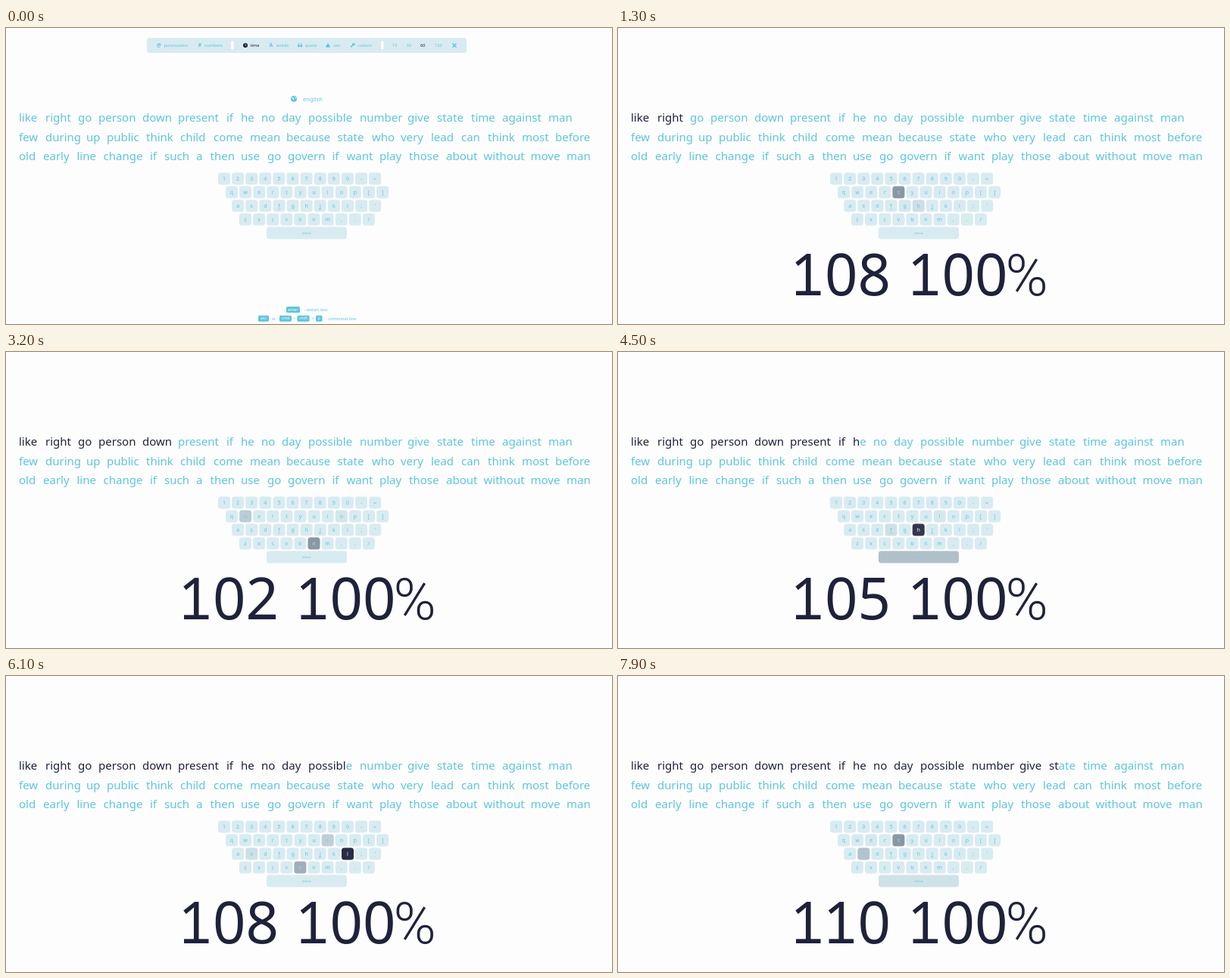
An HTML page with a canvas for the animation above (8000 ms loop, 800 px wide and 392 px high).

```html
<!DOCTYPE html>
<html lang="en">
<head>
<meta charset="utf-8">
<title>Typing test</title>
<style>
html, body { margin: 0; width: 100%; height: 100%; overflow: hidden; background: #fdfdfe; }
canvas { display: block; width: 800px; height: 392px; }
</style>
</head>
<body>
<canvas id="stage"></canvas>
<script>
const LOOP = 8000, START = 205, FADE = 125;
const BG = [253, 253, 254], SUB = [94, 197, 220], ALT = [216, 235, 241], DARK = [30, 34, 58];
const SANS = '"Noto Sans", "Open Sans", sans-serif';

const canvas = document.getElementById('stage');
const ctx = canvas.getContext('2d');
const ratio = window.devicePixelRatio || 1;
canvas.width = 800 * ratio;
canvas.height = 392 * ratio;

const lines = [
  ['like right go person down present if he no day possible number give state time against man',
    [17, 52, 95, 122, 180, 227, 291, 310, 337, 364, 399, 467, 530, 569, 614, 655, 716]],
  ['few during up public think child come mean because state who very lead can think most before',
    [17, 52, 106, 133, 185, 230, 274, 322, 370, 437.5, 483, 521, 561, 601, 636, 681, 725]],
  ['old early line change if such a then use go govern if want play those about without move man',
    [17, 49, 93.5, 128.5, 190, 209, 251, 269.5, 310, 345, 372, 430.5, 449.5, 493, 532, 581, 630.5, 692.5, 740]],
].map(([text, xs]) => ({ text, words: text.split(' ').map((word, i) => [word, xs[i]]) }));

// Typing rhythm: [characters typed, time]; steady between the points.
const rhythm = [[1, START], [9, 1100], [10, 1238], [16, 2150], [17, 2200], [18, 2297], [24, 3065], [25, 3138],
  [35, 4195], [36, 4290], [37, 4390], [38, 4493], [45, 5195], [51, 5890], [52, 5960], [53, 6015], [54, 6097],
  [55, 6190], [64, 7200], [68, 7680], [69, 7785], [70, 7838]];
const presses = [START];
for (let i = 1; i < rhythm.length; i++) {
  const [n0, t0] = rhythm[i - 1], [n1, t1] = rhythm[i];
  for (let n = n0 + 1; n <= n1; n++) presses.push(t0 + (t1 - t0) * (n - n0) / (n1 - n0));
}
const typedAt = t => presses.filter(p => p <= t).length;

const keyRows = [['1234567890-=', 288], ['qwertyuiop[]', 298], ["asdfghjkl;'", 306.2], ['zxcvbnm,./', 316]];

const rgb = c => `rgb(${c})`;
const mix = (a, b, k) => rgb(a.map((v, i) => Math.round(v + (b[i] - v) * k)));
const clamp = v => Math.max(0, Math.min(1, v));

function text(str, x, y, size, color = rgb(SUB), align = 'left', weight = 400, family = SANS) {
  ctx.font = `${weight} ${size}px ${family}`;
  ctx.textAlign = align;
  ctx.fillStyle = color;
  ctx.fillText(str, x, y);
}

function box(x, y, w, h, r, color) {
  ctx.fillStyle = color;
  ctx.beginPath();
  ctx.roundRect(x, y, w, h, r);
  ctx.fill();
}

function disc(x, y, r, color = rgb(SUB)) {
  ctx.fillStyle = color;
  ctx.beginPath();
  ctx.arc(x, y, r, 0, 7);
  ctx.fill();
}

function stroke(points, width, color = rgb(SUB)) {
  ctx.strokeStyle = color;
  ctx.lineWidth = width;
  ctx.beginPath();
  points.forEach(([x, y]) => ctx.lineTo(x, y));
  ctx.stroke();
}

function drawMenu() {
  box(186, 13, 422, 20, 4, rgb(ALT));
  box(297, 17, 3.5, 11.5, 1.5, rgb(BG));
  box(495, 17, 3.5, 11.5, 1.5, rgb(BG));
  const dark = rgb(DARK), label = (str, x, color) => text(str, x, 25, 5.6, color);
  label('punctuation', 208.5);
  label('numbers', 262);
  label('time', 322.5, dark);
  label('words', 357);
  label('quote', 395);
  label('zen', 432);
  label('custom', 464);
  label('15', 510);
  label('30', 528.5);
  label('60', 547, dark);
  label('120', 566);

  text('@', 202, 25, 6.5, rgb(SUB), 'center', 700);
  text('#', 255.8, 25.4, 7, rgb(SUB), 'center', 700);
  text('A', 350, 25.4, 7, rgb(SUB), 'center', 700);
  disc(316, 23, 3, dark);
  stroke([[316, 21], [316, 23], [317.3, 24]], 0.7, rgb(ALT));
  for (const x of [386.6, 390]) {
    disc(x, 24, 1.4);
    stroke([[x - 0.9, 24], [x - 0.7, 21.5], [x + 1, 20.7]], 1);
  }
  ctx.fillStyle = rgb(SUB);
  ctx.beginPath();
  ctx.moveTo(425, 20);
  ctx.lineTo(428.3, 25.6);
  ctx.lineTo(421.7, 25.6);
  ctx.fill();
  stroke([[455, 25.4], [458.5, 22]], 1.5);
  disc(459, 21.6, 1.8);
  stroke([[459, 21.6], [461, 19.6]], 1, rgb(ALT));
  stroke([[589.5, 20.5], [594.5, 25.5]], 1.5);
  stroke([[589.5, 25.5], [594.5, 20.5]], 1.5);
}

function drawLanguage() {
  disc(380, 93.8, 4);
  stroke([[377.3, 92], [379.5, 93], [379, 95.2]], 1.1, rgb(BG));
  stroke([[381, 90.8], [382, 92.5], [383.4, 92.8]], 0.9, rgb(BG));
  text('english', 392, 96.6, 7.6);
}

function drawTips() {
  const cap = (str, x, y, w) => {
    box(x, y, w, 8, 1.5, rgb(SUB));
    text(str, x + w / 2, y + 5.7, 5.3, rgb(BG), 'center');
  };
  cap('enter', 370, 369, 18);
  text('- restart test', 393, 374.8, 5.5);
  cap('esc', 333, 380.7, 14);
  text('or', 351, 386.5, 5.5);
  cap('cmd', 361, 380.7, 16);
  text('+', 381, 386.5, 5, rgb(SUB), 'center');
  cap('shift', 384.5, 380.7, 16);
  text('+', 405, 386.5, 5, rgb(SUB), 'center');
  cap('p', 409, 380.7, 8.5);
  text('- command line', 422, 386.5, 5.5);
}

function drawWords(typed) {
  lines.forEach(({ words }, row) => {
    let left = row ? 0 : typed;
    for (const [word, x] of words) {
      const n = Math.max(0, Math.min(word.length, left));
      const y = 124 + row * 25.6, done = word.slice(0, n);
      text(done, x, y, 15, rgb(DARK));
      text(word.slice(n), x + ctx.measureText(done).width, y, 15);
      left -= word.length + 1;
    }
  });
}

function drawKeyboard(t, typed) {
  // A pressed key flashes dark and eases back exponentially.
  const glow = char => {
    const i = lines[0].text.slice(0, typed).lastIndexOf(char);
    const age = i < 0 ? 500 : t - presses[i];
    return age < 500 ? 2 ** (-age / 50) : 0;
  };
  const key = (char, label, x, y, w, size) => {
    const k = glow(char), color = mix(SUB, BG, k);
    box(x - w / 2, y - 8, w, 16, 3.5, mix(ALT, DARK, k));
    text(label, x, y + size * 0.35, size, color, 'center');
    if (char === 'f' || char === 'j') {
      ctx.fillRect(x - 1.7, y + 4.2, 3.4, 0.6);
    }
  };
  keyRows.forEach(([chars, x], row) =>
    [...chars].forEach((c, i) => key(c, c, x + i * 18.1, 199.5 + row * 18, 16, 7)));
  key(' ', 'default', 397, 271.5, 106, 3.4);
}

function drawNumber(digits, x) {
  for (const d of digits) {
    const one = d === '1';
    text(d, x - (one ? 2 : 0), 354, 76, rgb(DARK));
    if (one) ctx.fillRect(x + 5.5, 348.3, 32.5, 5.7);
    x += 43.5;
  }
  return x;
}

function drawStats(t) {
  const seconds = Math.floor((t - START) / 1000);
  const wpm = seconds < 1 ? '0' : String(Math.round(typedAt(START + seconds * 1000) * 12 / seconds));
  const x = drawNumber(wpm, 400 - (wpm.length * 43.5 + 210.5) / 2);
  text('%', drawNumber('100', x + 24) - 3, 354, 76, rgb(DARK), 'left', 300, 'Roboto, sans-serif');
}

function draw(t) {
  ctx.setTransform(ratio, 0, 0, ratio, 0, 0);
  ctx.fillStyle = rgb(BG);
  ctx.fillRect(0, 0, 800, 392);
  const typed = typedAt(t), shown = clamp((t - START) / FADE);
  drawWords(typed);
  drawKeyboard(t, typed);
  if (shown < 1) {
    ctx.globalAlpha = 1 - shown;
    drawMenu();
    drawLanguage();
    drawTips();
  }
  if (shown > 0) {
    ctx.globalAlpha = shown;
    drawStats(t);
  }
  ctx.globalAlpha = 1;
}

const began = performance.now();
function tick() {
  draw((performance.now() - began) % LOOP);
  requestAnimationFrame(tick);
}
tick();
</script>
</body>
</html>
```
